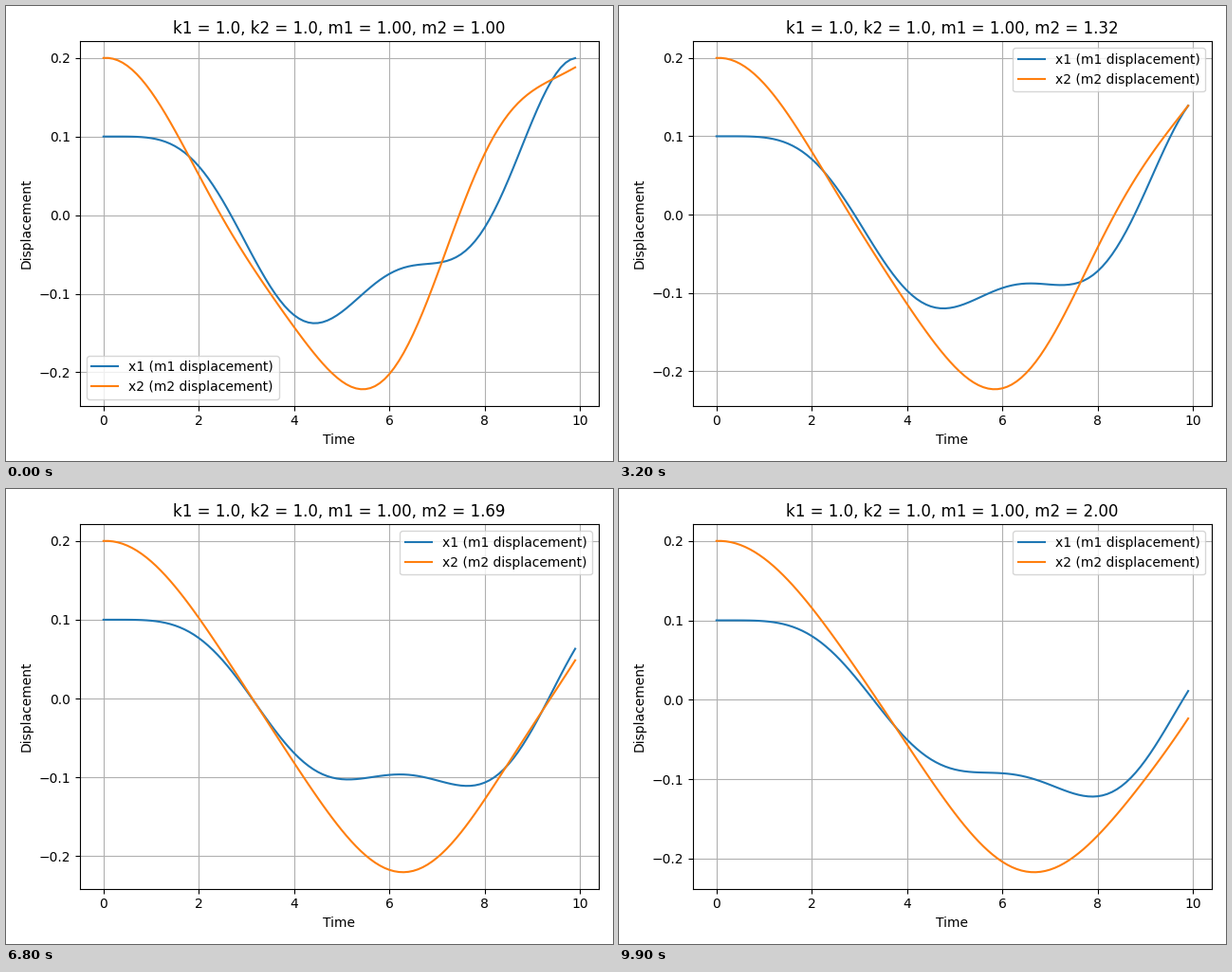
A matplotlib script that plays this animation: 640x480 px, repeating every 10000 ms.

```python
import matplotlib.pyplot as plt
import numpy as np
from matplotlib.animation import FuncAnimation

FRAMES = 100
K1, K2, M1 = 1.0, 1.0, 1.0
DT = 0.1
TIME = np.arange(100) * DT
MASSES = np.linspace(1.0, 2.0, FRAMES)


def simulate(m2):
    """Two masses on two springs, stepped with explicit Euler."""
    x1, x2, v1, v2 = 0.1, 0.2, 0.0, 0.0
    path = []
    for _ in TIME:
        path.append((x1, x2))
        a1 = (-K1 * x1 + K2 * (x2 - x1)) / M1
        a2 = -K2 * (x2 - x1) / m2
        x1, x2 = x1 + v1 * DT, x2 + v2 * DT
        v1, v2 = v1 + a1 * DT, v2 + a2 * DT
    return np.array(path).T


fig, ax = plt.subplots(figsize=(6.4, 4.8), dpi=100)
lines = [ax.plot([], [], label=f"x{n} (m{n} displacement)")[0] for n in (1, 2)]
ax.set_xlabel("Time")
ax.set_ylabel("Displacement")
ax.grid(True)
ax.legend(loc="best")


def update(i):
    m2 = MASSES[i]
    for line, x in zip(lines, simulate(m2)):
        line.set_data(TIME, x)
    ax.relim()
    ax.autoscale_view()
    ax.set_title(f"k1 = {K1:.1f}, k2 = {K2:.1f}, m1 = {M1:.2f}, m2 = {m2:.2f}")
    return lines


update(0)
fig.tight_layout()
anim = FuncAnimation(fig, update, frames=FRAMES, interval=100, repeat=True,
                     repeat_delay=0, blit=False)
plt.show()
```
